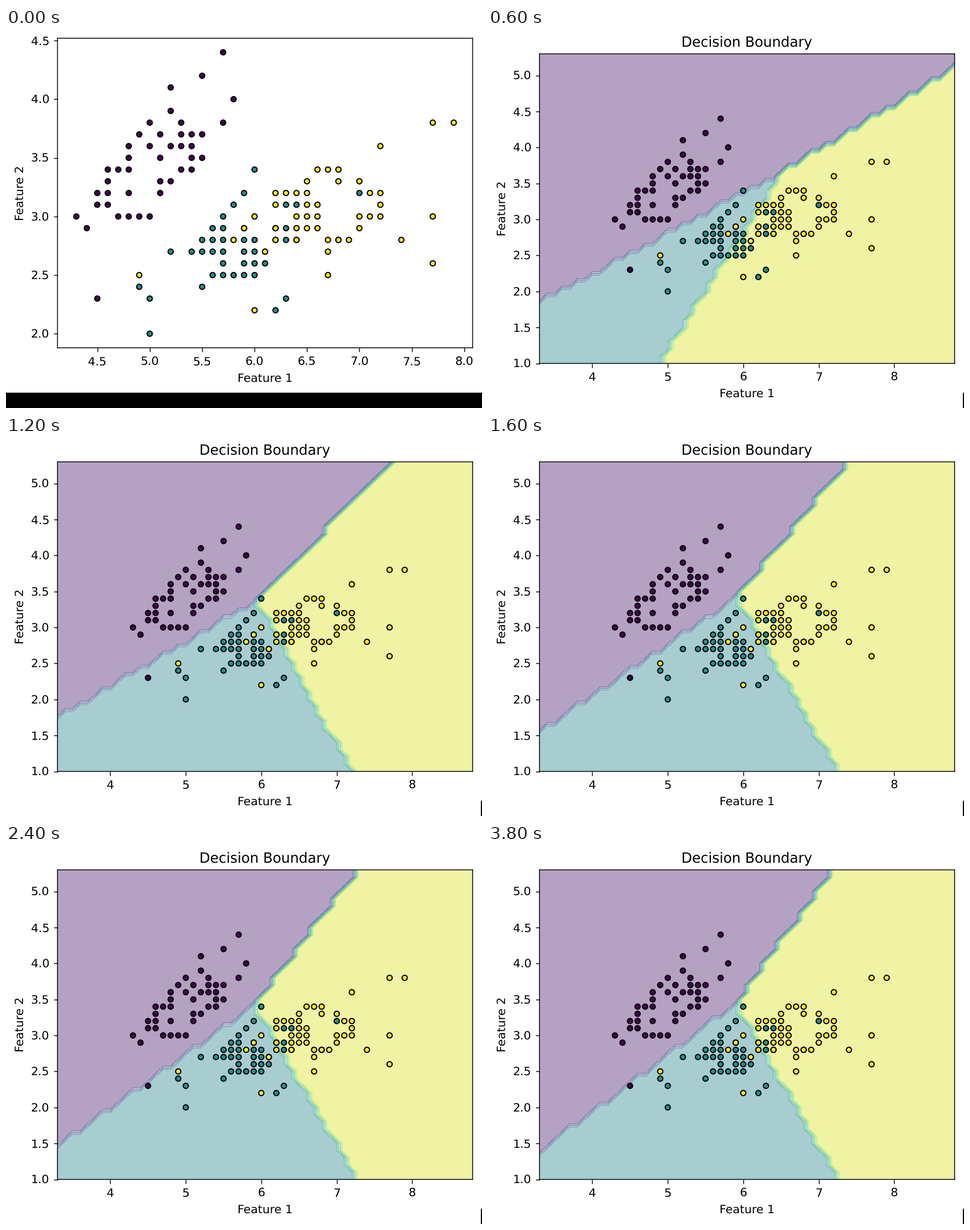
These frames come from a looping animation (837 by 669 pixels, 4400 ms). A matplotlib script:

```python
import numpy as np
import matplotlib.pyplot as plt
from matplotlib.animation import FuncAnimation
from matplotlib.patches import Rectangle
from matplotlib.ticker import MultipleLocator

W, H, DPI = 837, 669, 128
K = 1.15  # point sizes relative to matplotlib defaults
COUNT = 22

plt.rcParams.update({
    "font.family": "DejaVu Sans",
    "font.size": 10 * K,
    "text.hinting": "none",
    "axes.linewidth": 0.72 * K,
    "axes.titlepad": 6 * K,
})
for side, pad in (("xtick", 4), ("ytick", 3.5)):
    plt.rcParams[side + ".major.size"] = 3.5 * K
    plt.rcParams[side + ".major.width"] = 0.72 * K
    plt.rcParams[side + ".major.pad"] = pad * K

# Each class: centre, spread and correlation of its core, then its outliers
CLASSES = [
    ((5.0, 3.4), (0.33, 0.30), 0.7,
     [(4.5, 2.3), (4.3, 3.0), (4.4, 2.9), (5.2, 4.1), (5.5, 4.2), (5.7, 4.4),
      (5.8, 4.0), (5.7, 3.8)]),
    ((5.9, 2.8), (0.35, 0.24), 0.5,
     [(5.0, 2.0), (5.0, 2.3), (4.9, 2.4), (5.2, 2.7), (6.2, 2.2), (6.3, 2.3),
      (7.0, 3.2), (6.8, 2.8), (6.0, 3.4)]),
    ((6.5, 3.0), (0.42, 0.22), 0.45,
     [(4.9, 2.5), (6.0, 2.2), (6.7, 2.5), (7.7, 2.6), (7.4, 2.8), (7.7, 3.0),
      (7.2, 3.6), (7.7, 3.8), (7.9, 3.8)]),
]


def cluster(rng, centre, spread, corr, outliers, n=42):
    """Points spread over a tilted ellipse, measured to one decimal."""
    r, t = 1.7 * np.sqrt(rng.random(n)), 2 * np.pi * rng.random(n)
    u, v = r * np.cos(t), r * np.sin(t)
    v = corr * u + np.sqrt(1 - corr ** 2) * v
    core = np.column_stack([u, v]) * spread + centre
    return np.unique(np.round(np.vstack([core, outliers]), 1), axis=0)


rng = np.random.default_rng(4)
groups = [cluster(rng, *spec) for spec in CLASSES]
points = np.vstack(groups)
labels = np.repeat(np.arange(3), [len(g) for g in groups])

# Key training steps: step number, the point where the regions meet, then the
# slopes dy/dx of line 0|1, dx/dy of line 1|2 and dx/dy of line 0|2
KEYS = np.array([
    (1, 7.893, 4.416, 0.5714, 1.031, 1.733),
    (3, 6.530, 3.673, 0.566, 0.605, 1.587),
    (4, 6.240, 3.530, 0.573, 0.120, 1.305),
    (6, 5.950, 3.387, 0.620, -0.530, 0.935),
    (8, 5.928, 3.428, 0.715, -0.552, 0.779),
    (12, 5.927, 3.428, 0.750, -0.557, 0.720),
    (17, 5.915, 3.451, 0.790, -0.552, 0.687),
])

gx, gy = np.meshgrid(3.3 + np.arange(56) / 10, 1.0 + np.arange(44) / 10)


def classify(step):
    """Predicted class at every grid point after a training step."""
    tx, ty, a, b, c = (np.interp(step, KEYS[:, 0], col)
                       for col in KEYS[:, 1:].T)
    dx, dy = gx - tx, gy - ty
    first = (dy > a * dx) & (dx < c * dy)
    return np.where(first, 0, np.where(dx > b * dy, 2, 1))


fig = plt.figure(figsize=(W / DPI, H / DPI), dpi=DPI, facecolor="white")


def make_axes(top, xlim, ylim, xstep):
    ax = fig.add_axes([90.5 / W, 1 - (top + 545) / H, 730 / W, 545 / H])
    ax.scatter(*points.T, c=labels, cmap="viridis", s=20 * K * K,
               linewidths=K, edgecolors="k", zorder=2)
    ax.set(xlim=xlim, ylim=ylim)
    ax.set_xlabel("Feature 1", labelpad=4.8 * K)
    ax.set_ylabel("Feature 2", labelpad=4 * K)
    ax.xaxis.set_major_locator(MultipleLocator(xstep))
    ax.yaxis.set_major_locator(MultipleLocator(0.5))
    for spine in ax.spines.values():
        spine.set_snap(False)
    return ax


def black_bar(x):
    return fig.add_artist(Rectangle((x / W, 0), (W - x) / W, 27 / H,
                                    color="black", lw=0))


raw = make_axes(18, (4.12, 8.08), (1.88, 4.52), 0.5)
fitted = make_axes(45.5, (3.3, 8.8), (1.0, 5.3), 1)
fitted.set_title("Decision Boundary")
wide_bar, thin_bar = black_bar(0), black_bar(835)
regions = None


def draw(i):
    global regions
    if regions is not None:
        regions.remove()
        regions = None
    start = i == 0
    for artist in (raw, wide_bar):
        artist.set_visible(start)
    for artist in (fitted, thin_bar):
        artist.set_visible(not start)
    if not start:
        regions = fitted.contourf(gx, gy, classify(i), cmap="viridis",
                                  alpha=0.4, zorder=1)
        fitted.set(xlim=(3.3, 8.8), ylim=(1.0, 5.3))
    return []


anim = FuncAnimation(fig, draw, frames=COUNT, init_func=lambda: draw(0),
                     interval=200, repeat=True, repeat_delay=0, blit=False)
plt.show()
```
